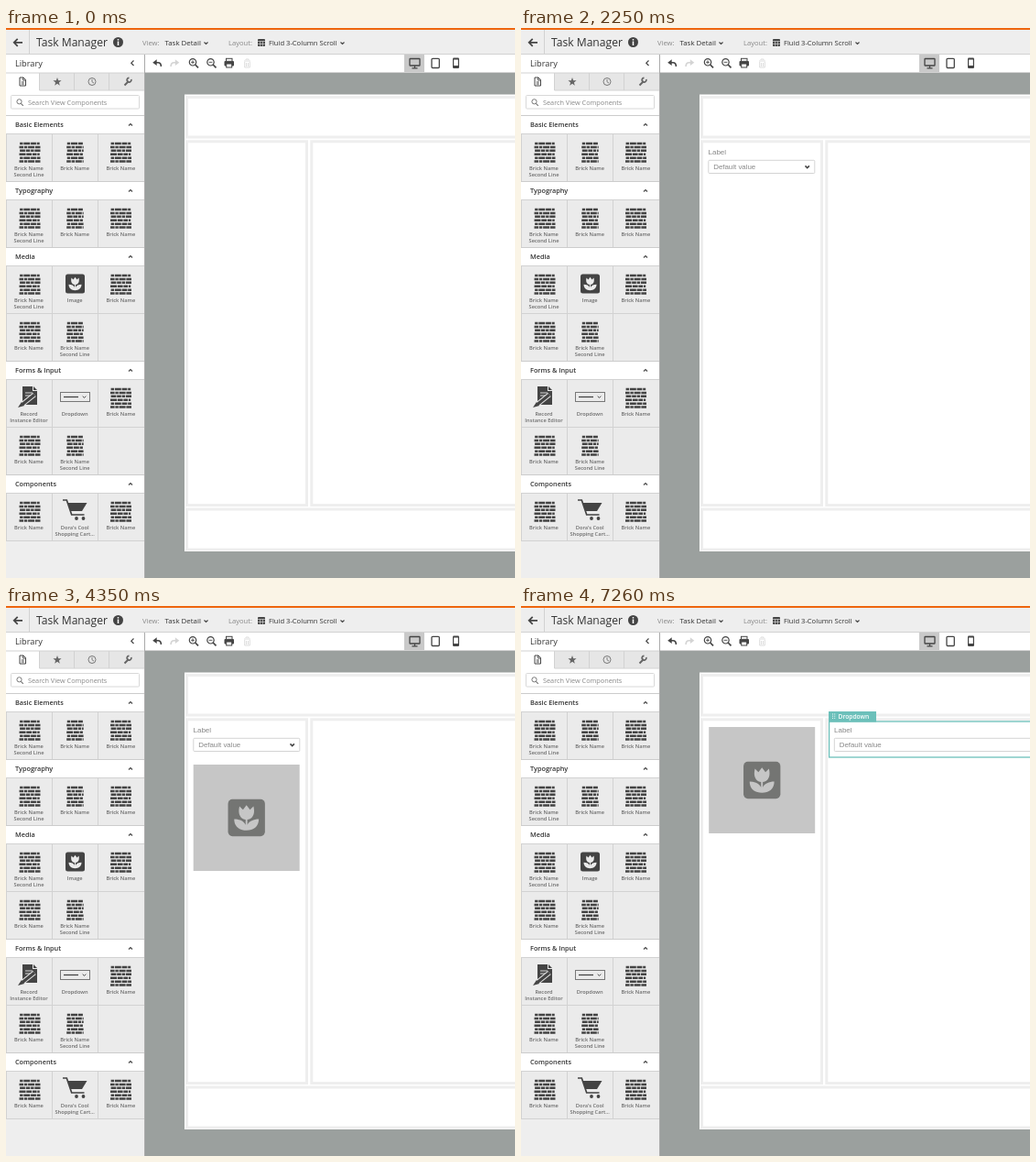
These frames come from a looping animation (556x600 px, 7.29 s). An HTML page:

```html
<!DOCTYPE html>
<html lang="en">
<head>
<meta charset="utf-8">
<title>Task Manager</title>
<style>
  html, body { margin: 0; width: 100%; height: 100%; overflow: hidden; background: #9ba09e; }
  svg { display: block; position: absolute; left: 0; top: 0; font-family: "Open Sans", "Noto Sans", sans-serif; }
  .form { font-family: "Liberation Sans", Arial, sans-serif; }
</style>
</head>
<body>
<svg id="stage" width="556" height="600" viewBox="0 0 556 600"></svg>
<script>
const LOOP = 7290;
const DARK = '#444', CELL = '#ebebeb', LINE = '#d2d2d2', YELLOW = '#f3c872', TEAL = '#6cc0ba';

// Drawing helpers, each returning SVG markup
const rect = (x, y, w, h, fill, more = '') =>
  `<rect x="${x}" y="${y}" width="${w}" height="${h}" fill="${fill}" ${more}/>`;
const line = (d, color = DARK, w = 1, more = '') =>
  `<path d="${d}" fill="none" stroke="${color}" stroke-width="${w}" ${more}/>`;
const shape = (d, fill = DARK) => `<path d="${d}" fill="${fill}"/>`;
const text = (x, y, s, size, fill = '#333', more = '') =>
  `<text x="${x}" y="${y}" font-size="${size}" fill="${fill}" ${more}>${s}</text>`;
const at = (x, y, body) => `<g transform="translate(${x} ${y})">${body}</g>`;
const layer = (id, body) => `<g id="${id}" opacity="0">${body}</g>`;
const chevron = (x, y, dir = 1, r = 2, w = 1.1) =>
  line(`M${x - r},${y - dir * r / 2}L${x},${y + dir * r / 2}L${x + r},${y - dir * r / 2}`, DARK, w);

// Icons, centred on 0,0
function bricks(w) {
  let d = '';
  for (let row = 0; row < 6; row++) {
    const y = -10.2 + row * 3.9;
    let x = -w / 2 + (row % 2 ? 0 : 0.6);
    const end = w / 2 - (row % 3 ? 0 : 0.8);
    for (let i = 0; x < end - 1; i++) {
      const len = Math.min(3.4 + (row * 5 + i * 3) % 4 * 1.2, end - x);
      d += `M${x.toFixed(1)},${y.toFixed(1)}h${len.toFixed(1)}v2.5h${(-len).toFixed(1)}z`;
      x += len + 0.8;
    }
  }
  return shape(d);
}

function tulip(box = DARK, flower = CELL) {
  return rect(-10.5, -10.5, 21, 21, box, 'rx="2.5"') +
    shape('M-4,-6.5L-2,-4.6L0,-7.2L2,-4.6L4,-6.5C5.2,-1.5 3,.8 .5,1V4C1.5,2 4,.8 7,.8C7,5 4,7.2 0,7.2' +
      'C-4,7.2 -7,5 -7,.8C-4,.8 -1.5,2 -.5,4V1C-3,.8 -5.2,-1.5 -4,-6.5Z', flower);
}

const dropIcon = rect(-16, -5.5, 32, 10, 'none', 'stroke="#777" stroke-width="1"') +
  line('M-12.5,-.5H3.5', DARK, 1.3) + chevron(10, -0.5, 1, 1.8, 1);

const recordIcon = shape('M-8,-12H3V-7H8V8H-8Z') + shape('M4,-12L8,-8H4Z') +
  line('M-5,-5H3M-5,-2H4', CELL, 0.9) +
  line('M5,-3L-10,9', CELL, 5.4) + line('M5,-3L-8,7.5', DARK, 3.4) + shape('M-9,5L-6,9L-13,11Z');

const cartIcon = line('M-13.5,-12H-9.2L-3.8,4H10', DARK, 1.7) + shape('M-8,-9H13L7.5,0H-5Z') +
  `<circle cx="1.5" cy="8" r="1.9" fill="${DARK}"/><circle cx="9" cy="8" r="1.9" fill="${DARK}"/>`;

const ICONS = { wide: bricks(23), slim: bricks(18.5), image: tulip(), drop: dropIcon, record: recordIcon, cart: cartIcon };

const caption = (x, y, s) => s.split('|').map((part, i) =>
  text(x, y + i * 6.8, part, 5.7, '#6c6c6c', 'font-weight="600" text-anchor="middle"')).join('');

// Sidebar
const ONE = 'Brick Name', TWO = 'Brick Name|Second Line';
const ROW = [['wide', TWO], ['slim', ONE], ['wide', ONE]];
const PAIR = [['wide', ONE], ['slim', TWO], null];
const SECTIONS = [
  ['Basic Elements', [ROW]],
  ['Typography', [ROW]],
  ['Media', [[['wide', TWO], ['image', 'Image'], ['wide', ONE]], PAIR]],
  ['Forms &amp; Input', [[['record', 'Record|Instance Editor'], ['drop', 'Dropdown'], ['wide', ONE]], PAIR]],
  ['Components', [[['wide', ONE], ['cart', "Dora's Cool|Shopping Cart..."], ['wide', ONE]]]]
];

function sidebar() {
  let out = rect(0, 29, 151, 571, '#eee') + rect(0, 29, 151, 66, '#fff');
  out += text(10, 41.5, 'Library', 9.2) + line('M139.5,35.5L136.8,38.2L139.5,41', DARK, 1.2);
  out += rect(36, 49, 115, 19, '#e6e6e6') + line('M0,49H151M36.5,68H151M36.5,49V68M74.5,49V68M112.5,49V68', LINE);
  // Tab icons
  out += line('M15,54H19L21.5,56.5V63H15ZM18.7,54V57H21.5M16.8,59H19.8M16.8,61H19.8', DARK, 1);
  const star = Array.from({ length: 10 }, (_, i) => {
    const a = i * Math.PI / 5, r = i % 2 ? 2 : 4.8;
    return `${(56 + r * Math.sin(a)).toFixed(2)},${(58.8 - r * Math.cos(a)).toFixed(2)}`;
  });
  out += shape(`M${star.join('L')}Z`, '#666');
  out += `<circle cx="94" cy="58.5" r="4" fill="none" stroke="#777"/>` + line('M94,56V58.8L96,60', '#777', 0.9);
  out += line('M129.5,62.5L134,58', '#666', 2) + line('M136.8,56A2.4,2.4 0 1 1 134.5,54.3', '#666', 1.7);
  // Search box
  out += rect(5.5, 73.5, 140, 14.5, '#fff', 'stroke="#d8d8d8" rx="1"');
  out += `<circle cx="14.5" cy="80.3" r="2.6" fill="none" stroke="#777"/>` + line('M16.4,82.3L18.8,84.8', '#777', 1.2);
  out += text(24, 83.8, 'Search View Components', 7.3, '#888');

  let y = 95;
  for (const [title, rows] of SECTIONS) {
    out += rect(0, y, 151, 20, '#fff') + text(10, y + 13, title, 7.3, '#333', 'font-weight="600"') + chevron(136, y + 10.5, -1);
    out += line(`M0,${y + 0.5}H151`, '#ccc');
    y += 20;
    for (const cells of rows) {
      out += rect(0, y, 151, 52, CELL);
      cells.forEach((cell, i) => {
        if (cell) out += at([26, 75.5, 125.5][i], y + 20, ICONS[cell[0]]) + caption(25 + i * 50.2, y + 40, cell[1]);
      });
      out += line(`M0,${y + 0.5}H151M50.5,${y}V${y + 52}M100.5,${y}V${y + 52}M0.5,${y}V${y + 52}`, LINE);
      y += 52;
    }
  }
  return out + line(`M0,${y + 0.5}H151`, LINE) + line('M151.5,29V600', '#aaa');
}

function header() {
  let out = rect(0, 0, 556, 29, '#eee') + rect(0, 0, 556, 2, '#ee660e');
  out += line('M0,28.5H556M25.5,2V28', LINE);
  out += line('M18,15.8H9M12.7,11.8L8.7,15.8L12.7,19.8', DARK, 1.7);
  out += text(33, 20, 'Task Manager', 12.1);
  out += `<circle cx="122.5" cy="15.5" r="5.5" fill="${DARK}"/>` + line('M122.5,12V13.4M122.5,14.5V19', '#fff', 1.5);
  out += text(149, 19, 'View:', 7.6, '#888') + text(173.5, 19, 'Task Detail', 7.9) + chevron(218.5, 16.5);
  out += text(243, 19, 'Layout:', 7.6, '#888') + text(287, 19, 'Fluid 3-Column Scroll', 7.6) + chevron(367.5, 16.5);
  out += rect(275, 12, 8, 8, DARK, 'rx="1"') + line('M275,14.5H283M277.7,14.5V20M280.4,14.5V20M275,17.3H283', '#eee', 0.6);
  return out;
}

const arrow = color => line('M-1,-.8H1Q4.4,-.8 4.4,3.5', color, 1.6) + shape('M-4.8,-.8L-.3,-4.2V2.6Z', color);
const lens = plus => `<circle r="3.7" fill="none" stroke="${DARK}" stroke-width="1.2"/>` +
  line('M2.7,2.7L6,6', DARK, 1.7) + line('M-1.9,0H1.9' + (plus ? 'M0,-1.9V1.9' : ''), DARK, 0.9);

function toolbar() {
  let out = rect(152, 29, 404, 20, '#fff') + line('M152,48.5H556', LINE);
  out += at(165, 38.5, arrow(DARK)) + at(184.5, 38.5, `<g transform="scale(-1 1)">${arrow('#d4d4d4')}</g>`);
  out += at(204, 37.3, lens(true)) + at(223.5, 37.3, lens(false));
  out += rect(238.5, 36, 10.5, 5.5, DARK, 'rx="1"') + rect(240.5, 33.3, 6.5, 3, '#fff', `stroke="${DARK}"`) +
    rect(240.7, 39, 6, 4, '#fff', `stroke="${DARK}"`);
  out += line('M260,36H267M262,35V34H265V35M260.7,37V43H266.3V37M262.5,38V42M264.5,38V42', '#d8d8d8', 0.9);
  out += rect(435, 29, 22, 19, '#c9c9c9');
  out += rect(441, 33.5, 11, 7.5, 'none', `stroke="${DARK}" stroke-width="1.3" rx=".6"`) + line('M446.5,41V43.5M443.5,43.8H449.5', DARK, 1.2);
  out += rect(465, 33.3, 8.3, 10.2, 'none', `stroke="${DARK}" stroke-width="1.3" rx="1"`);
  out += rect(488, 32.5, 7, 11.5, DARK, 'rx="1.2"') + rect(489.2, 34.5, 4.6, 6.5, '#fff');
  return out;
}

// Page regions
const FRAME = { left: [197.5, 123.8, 131, 396.8], right: [333.8, 123.8, 260, 396.8] };
const frame = (box, color) => rect(...box, 'none', `stroke="${color}" stroke-width="3"`);

function page() {
  const boxes = [[197.5, 75.5, 400, 43.5], FRAME.left, FRAME.right, [197.5, 525, 400, 44]];
  return rect(195, 72.5, 400, 498.5, '#fff') + boxes.map(b => frame(b, '#eee')).join('');
}

function bar(x, y, w) {
  return rect(x, y, w, 10.5, YELLOW) + shape(`M${x},${y + 1.2}l4.3,4l-4.3,4z`, '#fff') +
    shape(`M${x + w},${y + 1.2}l-4.3,4l4.3,4z`, '#fff');
}

function field(x, w, back = '') {
  return `<g class="form">${back}` + text(x, 138, 'Label', 8, '#888') +
    rect(x + 0.3, 144.3, w, 14.2, '#fff', 'stroke="#d4d4d4" stroke-width="1" rx="1"') +
    text(x + 5.7, 154.3, 'Default value', 7.9, '#888') + chevron(x + w - 7.8, 151.5, 1, 2.2, 1.5) + '</g>';
}

function selected() {
  return rect(336.6, 126, 240, 39, '#fff', `stroke="${TEAL}" stroke-width="1.3"`) + rect(336, 115, 52, 11.5, TEAL) +
    line('M340.5,117.5V124M342.7,117.5V124', '#fff', 0.9, 'stroke-dasharray="1 1.2"') +
    text(346.5, 123, 'Dropdown', 6.7, '#fff', 'font-weight="600"') + field(342, 240);
}

const tile = (icon, label) => rect(-25.5, -26, 51, 52.5, CELL, 'stroke="#d9d9d9" stroke-width="1"') +
  at(0, -7, icon) + caption(0, 13.5, label);

const picture = rect(204.7, 173, 116, 116, '#c6c6c6') +
  at(262.7, 231, `<g transform="scale(1.92)">${tulip('#747573', '#c6c6c6')}</g>`);

document.getElementById('stage').innerHTML =
  rect(0, 0, 556, 600, '#9ba09e') + page() +
  layer('leftField', field(204.5, 116)) + layer('photo', picture) +
  layer('leftFrame', frame(FRAME.left, YELLOW)) +
  layer('barTop', bar(199, 126, 128)) + layer('barMid', bar(199, 167, 128)) +
  layer('ghost', field(204.5, 116, rect(202, 130, 120, 30, '#fff'))) +
  layer('rightFrame', frame(FRAME.right, YELLOW) + bar(335.5, 126, 260)) +
  layer('rightField', selected()) +
  header() + toolbar() + sidebar() +
  layer('dropTile', tile(dropIcon, 'Dropdown')) + layer('imageTile', tile(tulip(), 'Image'));

// Opacity keys: time, value
const FADES = {
  dropTile: [[599, 0], [600, 1], [1330, 1], [1520, 0]],
  imageTile: [[2799, 0], [2800, 1], [3720, 1], [3900, 0]],
  leftFrame: [[880, 0], [1080, 1], [1500, 1], [1700, 0], [3040, 0], [3300, 1], [3850, 1], [4050, 0]],
  barTop: [[880, 0], [1080, 1], [1440, 1], [1700, 0]],
  barMid: [[3020, 0], [3300, 1], [3800, 1], [4000, 0]],
  leftField: [[1600, 0], [1850, 1], [6480, 1], [6650, 0]],
  photo: [[3900, 0], [4150, 1]],
  ghost: [[5320, 0], [5380, 0.7], [6380, 0.7], [6550, 0]],
  rightFrame: [[5750, 0], [5950, 1], [6480, 1], [6680, 0]],
  rightField: [[6600, 0], [6850, 1]]
};

// Moves: start, end, from x, from y, to x, to y
const MOVES = {
  dropTile: [600, 1250, 75.5, 409, 244.5, 138.5],
  imageTile: [2805, 3455, 75.5, 285, 251, 169.5],
  ghost: [5320, 6020, 0, 0, 139, 0],
  photo: [6600, 6900, 0, 0, 0.5, -41]
};

const clamp = v => Math.min(1, Math.max(0, v));

function valueAt(keys, t) {
  let value = keys[0][1];
  for (let i = 1; i < keys.length; i++) {
    const [t0, a] = keys[i - 1], [t1, b] = keys[i];
    if (t >= t0) value = a + (b - a) * clamp((t - t0) / (t1 - t0));
  }
  return value;
}

const nodes = Object.fromEntries(Object.keys(FADES).map(id => [id, document.getElementById(id)]));

function draw() {
  const t = performance.now() % LOOP;
  for (const id in FADES) nodes[id].setAttribute('opacity', valueAt(FADES[id], t).toFixed(3));
  for (const id in MOVES) {
    const [start, end, x0, y0, x1, y1] = MOVES[id];
    const p = (1 - Math.cos(Math.PI * clamp((t - start) / (end - start)))) / 2;
    nodes[id].setAttribute('transform', `translate(${x0 + (x1 - x0) * p} ${y0 + (y1 - y0) * p})`);
  }
  requestAnimationFrame(draw);
}
draw();
</script>
</body>
</html>
```
